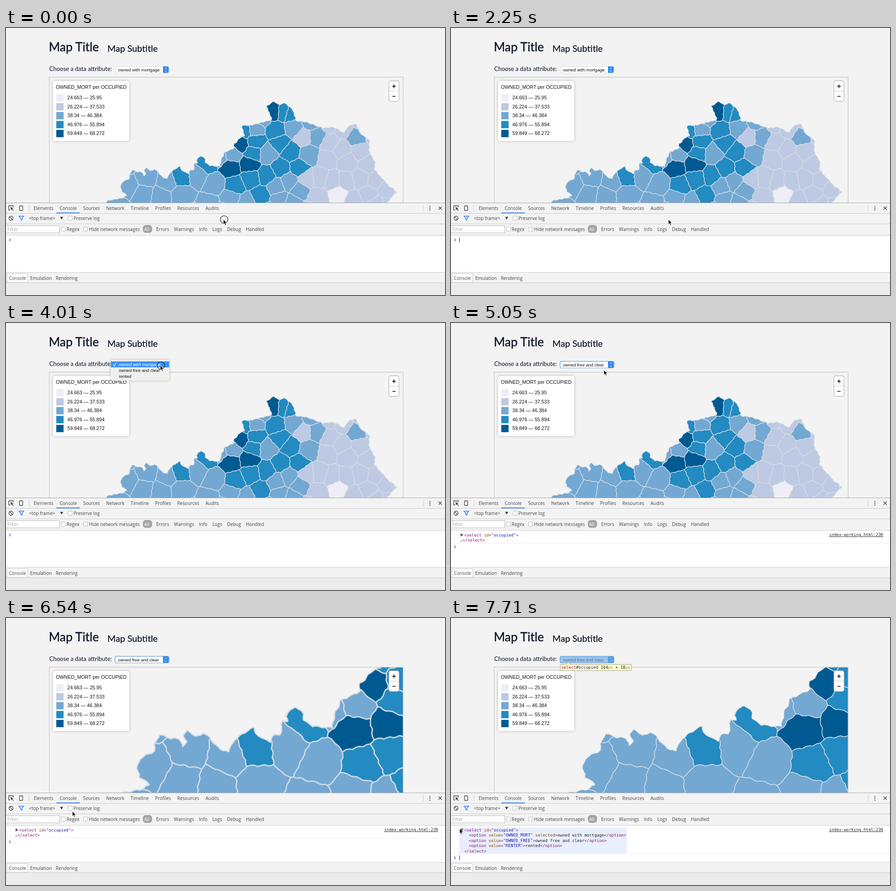
Animation of 959x584 px, one loop 8 s. Source, as an HTML page:

```html
<!DOCTYPE html>
<html lang="en">
<head>
<meta charset="utf-8">
<title>Choropleth and console</title>
<style>
html, body { margin: 0; width: 100%; height: 100%; overflow: hidden; background: #f3f3f3; }
svg { display: block; width: 959px; height: 584px; }
text { white-space: pre; }
.page { font-family: Lato, sans-serif; fill: #0a1426; }
.sans { font: 10.6px "Liberation Sans", Arial, sans-serif; fill: #111; }
.field { font-size: 9.6px; }
.ui { font: 10px "Open Sans", sans-serif; fill: #444; }
.mono { font: 8.94px "DejaVu Sans Mono", monospace; fill: #222; }
.tag { fill: #881280; } .attr { fill: #994500; } .val { fill: #1a1aa6; } .dim { fill: #888; }
.card { filter: drop-shadow(0 0 3px rgba(0,0,0,.22)); }
.rule { stroke: #ccc; fill: none; }
.box { fill: #fff; stroke: #b8b8b8; }

/* everything on the clock holds its pose until the next key */
.k, #map, #cursor, #prompt { animation: 8s step-end infinite; }
#map { transform-origin: 213px 368px; animation-name: zoom; stroke: #d6dde2; stroke-linejoin: round; }
#cursor { animation-name: move; }
#prompt { animation-name: drop; }
@keyframes zoom {
  0% { transform: scale(1); stroke-width: 1.3px; }
  79.8% { transform: scale(1.43); }
  81.7% { transform: scale(1.963); stroke-width: 1.3px; }
  83.4%, 100% { transform: scale(2); stroke-width: .75px; }
}
@keyframes move {
  0% { transform: translate(475px,419px); }
  35.4% { transform: translate(475px,419px); animation-timing-function: steps(8, start); }
  50.1% { transform: translate(337px,93px); }
  53.8% { transform: translate(334px,103px); }
  72.4% { transform: translate(334px,103px); animation-timing-function: steps(4, start); }
  79.8% { transform: translate(212px,371px); }
  81.7% { transform: translate(145px,423px); }
  83.4% { transform: translate(62px,449px); }
  85.3%, 100% { transform: translate(19px,461px); }
}
@keyframes drop {
  0% { transform: translateY(0); }
  61.2% { transform: translateY(26px); }
  92.7%, 100% { transform: translateY(61px); }
}
@keyframes caret {
  0% { opacity: 0; } 4% { opacity: 1; } 11.3% { opacity: 0; } 17% { opacity: 1; }
  22.4% { opacity: 0; } 28.1% { opacity: 1; } 35.4% { opacity: 0; } 92.7% { opacity: 1; }
}
@keyframes ring {
  0% { opacity: 1; } 1.7% { opacity: 0; } 50.1% { opacity: 1; } 52% { opacity: 0; }
  57.6% { opacity: 1; } 59.5% { opacity: 0; } 90.8% { opacity: 1; } 92.7% { opacity: 0; }
}
@keyframes menu { 0% { opacity: 0; } 50.1% { opacity: 1; } 61.2% { opacity: 0; } }
@keyframes first { 0% { opacity: 1; } 53.8% { opacity: 0; } }
@keyframes second { 0% { opacity: 0; } 53.8% { opacity: 1; } }
@keyframes before { 0% { opacity: 1; } 61.2% { opacity: 0; } }
@keyframes after { 0% { opacity: 0; } 61.2% { opacity: 1; } }
@keyframes folded { 0% { opacity: 0; } 61.2% { opacity: 1; } 92.7% { opacity: 0; } }
@keyframes open { 0% { opacity: 0; } 92.7% { opacity: 1; } }
@keyframes hover { 0% { opacity: 0; } 85.3% { opacity: 1; } }
@keyframes hand { 0% { opacity: 0; } 74.3% { opacity: 1; } 81.7% { opacity: 0; } }
@keyframes arrow { 0% { opacity: 1; } 74.3% { opacity: 0; } 81.7% { opacity: 1; } }
</style>
</head>
<body>
<svg viewBox="0 0 959 584">
  <defs>
    <clipPath id="frame"><path d="M95 108H867V383H95z"/></clipPath>
    <clipPath id="land"></clipPath>
  </defs>
  <rect width="959" height="584" fill="#f3f3f3"/>

  <g class="page">
    <text x="93.500" y="50.500" font-size="26.400" stroke="#0a1426" stroke-width=".35">Map Title</text>
    <text x="221.500" y="51.500" font-size="19.600" stroke="#0a1426" stroke-width=".25">Map Subtitle</text>
    <text x="94.500" y="94" font-size="13">Choose a data attribute:</text>
  </g>

  <g clip-path="url(#frame)"><g id="map"><g id="counties" clip-path="url(#land)"></g></g></g>
  <path d="M94.500 383V107.500H867.500V383" stroke="#ccc" stroke-width="1.400" fill="none"/>

  <g class="sans" id="legend">
    <rect class="card" x="103" y="116" width="166" height="131" rx="4" fill="#fff"/>
    <text x="109" y="132.500">OWNED_MORT per OCCUPIED</text>
  </g>

  <g stroke="#333" stroke-width="1.500">
    <rect x="836.500" y="115.500" width="22" height="45" rx="4" fill="#fff" stroke="#bbb" stroke-width="1.300"/>
    <path d="M837 138H858" stroke="#ccc" stroke-width="1"/>
    <path d="M843.500 127.500h8M847.500 123.500v8M844 149.500h7" stroke="#000"/>
  </g>

  <g class="sans field">
    <rect class="k" style="animation-name:after" x="237.500" y="83" width="119" height="16" rx="4" fill="#6fb1f5"/>
    <rect x="239" y="84.500" width="116" height="13.500" rx="3" fill="#fff" stroke="#d0d0d0" stroke-width=".7"/>
    <path d="M343 84h9q3.500 0 3.500 3v8q0 3-3.500 3h-9z" fill="#2f86f3"/>
    <path d="M347 89.500l2.200-2.500 2.200 2.500M347 93l2.200 2.500 2.200-2.500" fill="none" stroke="#fff"/>
    <text class="k" style="animation-name:before" x="244.500" y="94.500">owned with mortgage</text>
    <text class="k" style="animation-name:after" x="244.500" y="94.500">owned free and clear</text>
  </g>

  <g class="k sans field" style="animation-name:menu">
    <path class="card" d="M229 81H356.500V123q0 3-3 3H232q-3 0-3-3z" fill="#efefee"/>
    <g class="k" style="animation-name:first">
      <rect x="229" y="84" width="127.500" height="13" fill="#3b91f8"/>
      <text x="246.500" y="107">owned free and clear</text>
      <g fill="#fff"><text x="246.500" y="94">owned with mortgage</text>
      <path d="M234.500 91l2 3 4-7" fill="none" stroke="#fff" stroke-width="1.300"/></g>
    </g>
    <g class="k" style="animation-name:second">
      <rect x="229" y="97" width="127.500" height="13" fill="#3b91f8"/>
      <text x="246.500" y="94">owned with mortgage</text>
      <path d="M234.500 91l2 3 4-7" fill="none" stroke="#222" stroke-width="1.300"/>
      <text x="246.500" y="107" fill="#fff">owned free and clear</text>
    </g>
    <text x="246.500" y="120">rented</text>
  </g>

  <g class="k" style="animation-name:hover">
    <rect x="238.500" y="83.500" width="117" height="15" fill="#6fa8dc" opacity=".7"/>
    <path d="M239 101.500H250L256 97l6 4.500H394V115H239z" fill="#ffffc4" stroke="#8a8a8a" stroke-width=".8"/>
    <text class="mono" x="241" y="111"><tspan class="tag">select</tspan><tspan class="val">#occupied</tspan> 144<tspan class="dim">px</tspan> × 18<tspan class="dim">px</tspan></text>
  </g>

  <g id="tools">
    <rect y="382" width="959" height="202" fill="#f3f3f3"/>
    <rect y="454" width="959" height="80" fill="#fff"/>
    <rect y="557" width="959" height="27" fill="#ececec"/>
    <path d="M0 382.500H959" stroke="#a8a8a8"/>
    <path class="rule" d="M0 405.500H959M0 428.500H959M0 453.500H959M0 534.500H959M0 557H959M50.500 387v14M911.500 387v14"/>
    <rect x="110" y="403.500" width="51" height="2" fill="#3e82f1"/>
    <rect x="2.500" y="537.500" width="45" height="18.500" fill="#fff" stroke="#ccc"/>
    <rect class="box" x="-1" y="432.500" width="118" height="15.500"/>
    <rect class="box" x="135.500" y="411.500" width="9" height="9" rx="1.500"/>
    <rect class="box" x="121" y="435.500" width="9" height="9" rx="1.500"/>
    <rect class="box" x="169.500" y="435.500" width="9" height="9" rx="1.500"/>
    <rect x="299" y="431" width="20" height="17" rx="6" fill="#a3a3a3"/>
    <g fill="none" stroke="#444" stroke-width="1.300">
      <path d="M9 398H6V389H16V392"/>
      <path d="M9.500 391.500l7 3-3 1 3.500 3.500-1 1-3.500-3.500-1 2.500z" fill="#444" stroke="none"/>
      <rect x="29.500" y="389" width="7" height="10" rx="1"/>
      <circle cx="11" cy="416" r="4.500"/><path d="M8 413l6 6M945 390.500l7 7m0-7l-7 7"/>
      <path d="M28 411.500H39L35 416.500v4l-3-1.500v-2.500z" stroke="#3e82f1" fill="#cfe0fb"/>
    </g>
    <path d="M118 413h7l-3.500 6z" fill="#444"/>
    <path d="M926 390.500v8.100" stroke="#555" stroke-width="2.400" stroke-linecap="round" stroke-dasharray="0 4"/>
    <g class="ui">
      <text x="50" y="419.500">&lt;top frame&gt;</text>
      <text x="147.500" y="419.500">Preserve log</text>
      <text x="3" y="443.500" fill="#aaa">Filter</text>
      <text x="132.500" y="443.500">Regex</text>
      <text x="181.500" y="443.500">Hide network messages</text>
      <text x="302" y="443.500" fill="#fff">All</text>
    </g>
  </g>

  <g class="k" style="animation-name:after">
    <text class="mono" x="826" y="466" text-decoration="underline">index-working.html:236</text>
  </g>
  <g class="k mono" style="animation-name:folded">
    <rect class="k" style="animation-name:hover" x="18" y="458" width="130" height="22" fill="#e8eefb"/>
    <path d="M21 460l6 3.500-6 3.500z" fill="#555"/>
    <text class="tag" x="29" y="466.500">&lt;select <tspan class="attr">id</tspan>="<tspan class="val">occupied</tspan>"&gt;</text>
    <text class="tag" x="20" y="477.500">…&lt;/select&gt;</text>
    <path d="M0 481.500H959" stroke="#ededed"/>
  </g>
  <g class="k mono" style="animation-name:open" id="node">
    <rect x="18" y="458" width="366" height="57" fill="#e8eefb"/>
    <path d="M20 461h7l-3.500 6z" fill="#555"/>
    <text class="tag" x="29" y="466.500">&lt;select <tspan class="attr">id</tspan>="<tspan class="val">occupied</tspan>"&gt;</text>
    <text class="tag" x="29" y="512.500">&lt;/select&gt;</text>
    <path d="M0 516H959" stroke="#ededed"/>
  </g>

  <g id="prompt" fill="none">
    <path d="M7 460.500l3 3-3 3" stroke="#3b7de0" stroke-width="1.500"/>
    <path class="k" style="animation-name:caret" d="M18.500 458v11" stroke="#222"/>
  </g>

  <g id="cursor">
    <circle class="k" style="animation-name:ring" cx="1.500" cy="0" r="8.300" fill="none" stroke="#111" stroke-width="1.100"/>
    <path class="k" style="animation-name:arrow" d="M0 0V10.500L2.500 8.200 4.300 12.300 6.200 11.500 4.400 7.500H7.800z" fill="#000" stroke="#fff" stroke-width=".8"/>
    <path class="k" style="animation-name:hand" d="M-3 7L-6 1.500Q-7-1-4.500-.5L-3 1.500-4.500-3Q-4-5-2.500-4L-1.500-1-2-5Q-.5-7 .5-5L1-1 2-5Q3.500-6.500 4-4.500L3.500-.5 5-3Q6.500-3.500 6.500-2L5.500 3.500 4 7z" fill="#fff" stroke="#111"/>
  </g>
</svg>

<script>
const NS = 'http://www.w3.org/2000/svg';
const shade = { pale: '#efedf5', light: '#bec9e3', mid: '#73a8d3', strong: '#238bc1', dark: '#005a92' };

function add(parent, name, attrs, text) {
  const el = document.createElementNS(NS, name);
  for (const key in attrs) el.setAttribute(key, attrs[key]);
  if (text) el.textContent = text;
  parent.append(el);
  return el;
}
const byId = id => document.getElementById(id);
const points = list => list.split(' ').map(p => p.split(',').map(Number));

let seed = 11;
function random() {
  seed = seed * 16807 % 2147483647;
  return seed / 2147483647;
}

// A smooth field bends every line, so neighbours keep sharing their edges.
const ripple = (x, y) => [x + .9 * Math.sin(y * .55 + x * .13), y + .9 * Math.sin(x * .5 - y * .17)];

function outline(poly) {
  const out = [];
  poly.forEach(([x, y], i) => {
    const [u, v] = poly[(i + 1) % poly.length];
    const n = Math.ceil(Math.hypot(u - x, v - y) / 4);
    for (let k = 0; k < n; k++) out.push(ripple(x + (u - x) * k / n, y + (v - y) * k / n));
  });
  return 'M' + out.map(p => p.map(c => c.toFixed(1))).join('L') + 'z';
}

const coast = points('215,386 222,378 258,371 264,366 253,358 250,345 255,337 269,329 272,315 276,311 289,315 298,315 301,323 305,319 302,311 306,305 316,313 325,309 346,329 352,329 359,316 380,302 384,311 398,319 402,312 410,310 412,296 418,295 416,289 425,279 434,285 436,295 446,301 467,303 470,289 477,273 498,262 498,254 513,239 521,236 515,213 535,213 581,201 569,172 584,160 596,168 610,164 627,180 634,203 657,206 692,219 716,217 738,229 751,212 765,210 775,232 794,245 793,271 806,292 805,310 836,345 854,358 828,386');

// Counties that stand out; the rest are sown at random between them.
const landmarks = {
  dark: '585,183 512,253 490,305 532,298',
  strong: '383,325 440,296 606,184 621,188 590,224 522,224 545,248 540,274 500,345 640,306',
  mid: '268,345 306,328 352,336 300,362 338,368 384,365 418,322 456,340 494,276 543,222 572,275 768,238',
  light: '650,238',
  pale: '726,362',
};
const sites = Object.entries(landmarks).flatMap(([tone, list]) => points(list).map(([x, y]) => ({ x, y, tone })));

function toneAt(x, y) {
  if (x > (y > 322 ? 648 : 698)) return 'light';
  const lean = 556 + (285 - y) * .3;
  return Math.hypot((x - lean) / 66, (y - 285) / 95) < 1 ? 'strong' : 'mid';
}

for (let i = 0; i < 4000; i++) {
  const x = 215 + random() * 650, y = 165 + random() * 255;
  const gap = x < 460 ? 42 : 27;
  if (sites.every(s => Math.hypot(s.x - x, s.y - y) > gap)) sites.push({ x, y, tone: toneAt(x, y) });
}

// Voronoi cell: cut a large box by the bisector towards every other site.
function cell(s) {
  let poly = [[150, 100], [900, 100], [900, 450], [150, 450]];
  for (const o of sites) {
    if (o === s) continue;
    const side = ([x, y]) => (x - (s.x + o.x) / 2) * (o.x - s.x) + (y - (s.y + o.y) / 2) * (o.y - s.y);
    poly = poly.flatMap((p, i) => {
      const q = poly[(i + 1) % poly.length], a = side(p), b = side(q), t = a / (a - b);
      const kept = a <= 0 ? [p] : [];
      if (a * b < 0) kept.push([p[0] + (q[0] - p[0]) * t, p[1] + (q[1] - p[1]) * t]);
      return kept;
    });
  }
  return poly;
}

const shore = outline(coast);
add(byId('land'), 'path', { d: shore });
for (const s of sites) add(byId('counties'), 'path', { d: outline(cell(s)), fill: shade[s.tone] });
add(byId('map'), 'path', { d: shore, fill: 'none' });

['24.663 — 25.95', '26.224 — 37.533', '38.34 — 46.384', '46.976 — 55.894', '59.849 — 68.272'].forEach((label, i) => {
  const y = 144.8 + i * 19.5;
  add(byId('legend'), 'rect', { x: 109.8, y, width: 16, height: 16, fill: Object.values(shade)[i] });
  add(byId('legend'), 'text', { x: 134, y: y + 11.5 }, label);
});

function row(x, y, gap, words) {
  const line = add(byId('tools'), 'text', { class: 'ui', x, y });
  words.split(' ').forEach((word, i) => add(line, 'tspan', { dx: i ? gap : 0 }, word));
}
row(60.5, 397.5, 13.7, 'Elements Console Sources Network Timeline Profiles Resources Audits');
row(328, 443.5, 10.7, 'Errors Warnings Info Logs Debug Handled');
row(6.5, 550.5, 8.7, 'Console Emulation Rendering');

[['OWNED_MORT', 'owned with mortgage', ' selected'], ['OWNED_FREE', 'owned free and clear', ''], ['RENTER', 'rented', '']].forEach(([value, label, flag], i) => {
  const line = add(byId('node'), 'text', { x: 39, y: 478 + i * 11.5 });
  const span = (cls, text) => add(line, 'tspan', { class: cls }, text);
  span('tag', '<option ');
  span('attr', 'value');
  span('tag', '="');
  span('val', value);
  span('tag', '"');
  span('attr', flag);
  span('tag', '>');
  span('', label);
  span('tag', '</option>');
});
</script>
</body>
</html>
```
